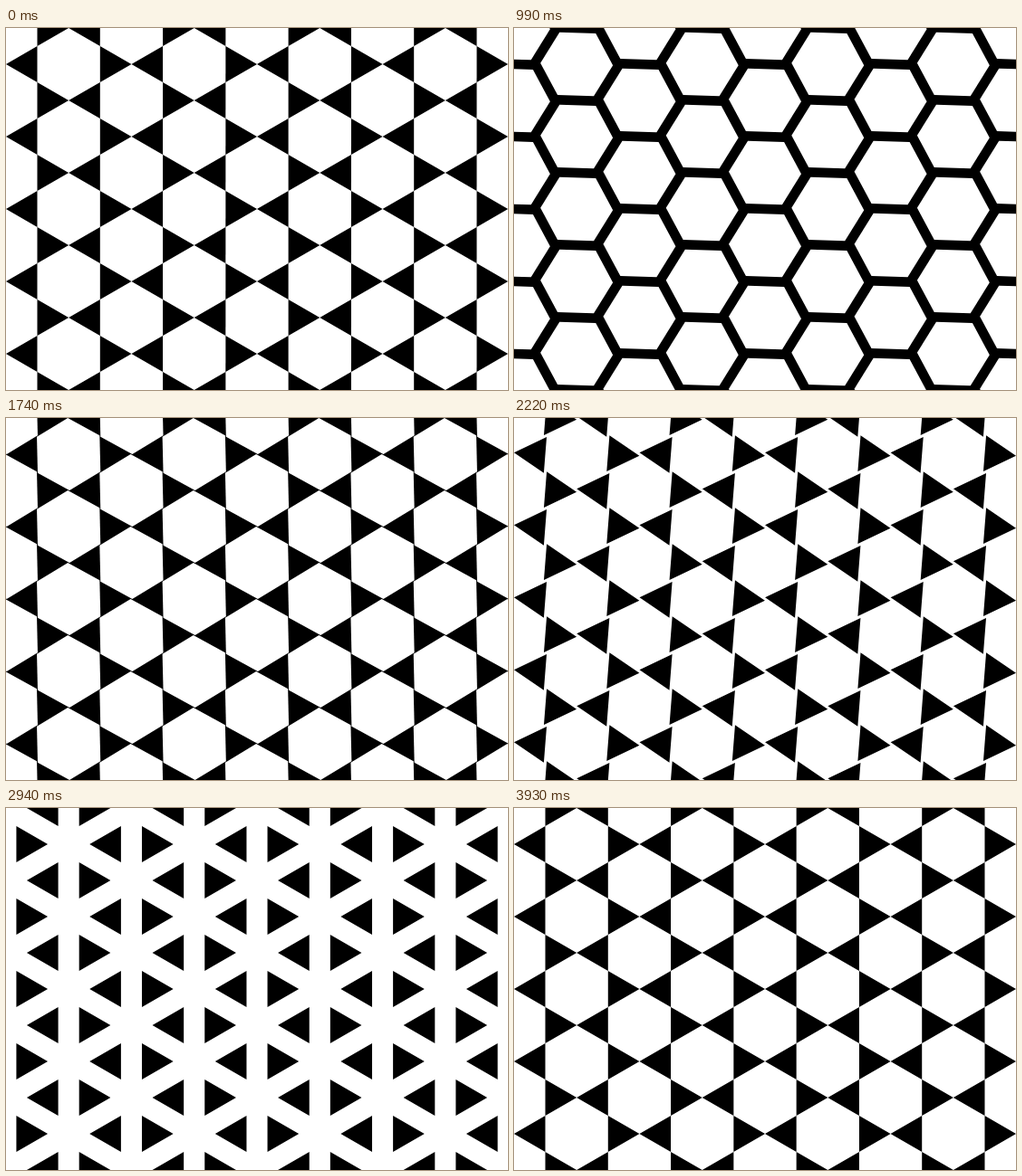
Recreate the animation shown at these times as an HTML page with a canvas. Size 554x400 px, loop 3960 ms.

```html
<!DOCTYPE html>
<html>
<head>
<meta charset="utf-8">
<style>
  html, body { margin: 0; width: 554px; height: 400px; overflow: hidden; background: #fff; }
  canvas { display: block; }
</style>
</head>
<body>
<canvas id="stage" width="554" height="400"></canvas>
<script>
const ctx = document.getElementById('stage').getContext('2d');
const LOOP = 3960, HALF = LOOP / 2, STEP = 30;
const SIDE = 40, RADIUS = SIDE / Math.sqrt(3);
const COL = SIDE * Math.sqrt(3);

const ease = p => p < 0.5 ? 2 * p * p : 1 - 2 * (1 - p) ** 2;

function polygon(x, y, sides, r, angle) {
  for (let i = 0; i < sides; i++) {
    const a = angle + i * 2 * Math.PI / sides;
    ctx.lineTo(x + r * Math.cos(a), y + r * Math.sin(a));
  }
  ctx.closePath();
}

// Visits the centre of every hexagon, measured from the middle of the stage.
function eachCell(visit) {
  for (let k = -5; k <= 5; k++)
    for (let j = -4; j <= 4; j++)
      visit(k * COL, j * 2 * SIDE + (k % 2 ? 0 : SIDE));
}

function fillCells(back, front, addShapes) {
  ctx.setTransform(1, 0, 0, 1, 0, 0);
  ctx.fillStyle = back;
  ctx.fillRect(0, 0, 554, 400);
  ctx.translate(277, 200);
  ctx.fillStyle = front;
  eachCell((x, y) => {
    ctx.beginPath();
    addShapes(x, y);
    ctx.fill();
  });
}

function triangle(x, y, angle) {
  ctx.moveTo(x + RADIUS * Math.cos(angle), y + RADIUS * Math.sin(angle));
  polygon(x, y, 3, RADIUS, angle);
}

function draw(time) {
  const t = (Math.floor(time / STEP) * STEP + STEP) % LOOP;
  const turn = ease(t % HALF / HALF) * Math.PI;
  if (t > 0 && t < HALF) {
    // White hexagons make a sixth of a turn.
    fillCells('#000', '#fff', (x, y) => polygon(x, y, 6, SIDE, Math.PI / 2 + turn / 3));
  } else {
    // Black triangles make a third of a turn.
    const angle = turn * 2 / 3;
    fillCells('#fff', '#000', (x, y) => {
      triangle(x - 2 * RADIUS, y, Math.PI + angle);
      triangle(x + 2 * RADIUS, y, angle);
    });
  }
}

const start = performance.now();
function tick() {
  draw(performance.now() - start);
  requestAnimationFrame(tick);
}
tick();
</script>
</body>
</html>
```
